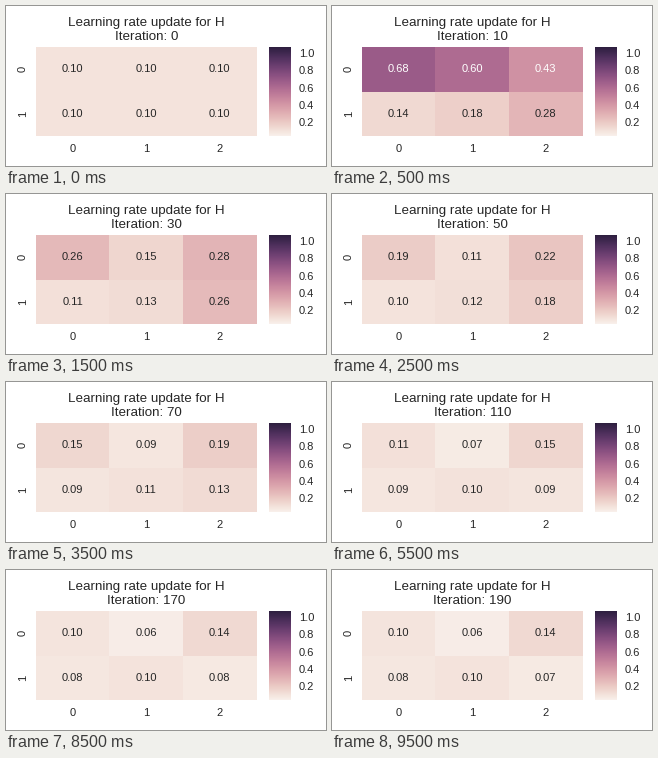
Animation of 320 by 160 pixels, one loop 10000 ms. Source, as a matplotlib script:

```python
import numpy as np
import matplotlib.pyplot as plt
from matplotlib.animation import FuncAnimation
from matplotlib.colors import ListedColormap, Normalize

W, H, DPI = 320, 160, 80
INK = "0.15"
STEP, FRAMES, INTERVAL = 10, 20, 500

plt.rcParams.update({
    "font.family": "Liberation Sans",
    "font.size": 10,
    "text.color": INK,
    "xtick.color": INK,
    "ytick.color": INK,
})

INITIAL = 0.1
PEAK_ITER, KNEE_ITER, DECAY = 10, 30, 36
PEAK = np.array([[0.68, 0.60, 0.43], [0.14, 0.18, 0.28]])
KNEE = np.array([[0.264, 0.155, 0.285], [0.114, 0.13, 0.26]])
LIMIT = np.array([[0.095, 0.059, 0.138], [0.084, 0.10, 0.072]])


def rates_at(iteration):
    """Jump to the peak, fall geometrically to the knee, then settle exponentially."""
    if iteration < PEAK_ITER:
        return np.full(PEAK.shape, INITIAL)
    if iteration < KNEE_ITER:
        progress = np.log(iteration / PEAK_ITER) / np.log(KNEE_ITER / PEAK_ITER)
        return PEAK * (KNEE / PEAK) ** progress
    return LIMIT + (KNEE - LIMIT) * np.exp((KNEE_ITER - iteration) / DECAY)


def cubehelix_map(start=0, rot=0.4, hue=0.8, light=0.95, dark=0.15):
    x = np.linspace(light, dark, 256)
    amp = hue * x * (1 - x) / 2
    phi = 2 * np.pi * (start / 3 + rot * x)
    weights = [(-0.14861, 1.78277), (-0.29227, -0.90649), (1.97294, 0)]
    rgb = [x + amp * (p * np.cos(phi) + q * np.sin(phi)) for p, q in weights]
    return ListedColormap(np.clip(np.transpose(rgb), 0, 1))


def text_color(rgb):
    rgb = np.asarray(rgb)
    linear = np.where(rgb <= 0.03928, rgb / 12.92, ((rgb + 0.055) / 1.055) ** 2.4)
    return INK if linear @ [0.2126, 0.7152, 0.0722] > 0.408 else "white"


def add_axes(left, top, right, bottom):
    return fig.add_axes([left / W, 1 - bottom / H, (right - left) / W, (bottom - top) / H])


fig = plt.figure(figsize=(W / DPI, H / DPI), dpi=DPI, facecolor="white")
ax = add_axes(29.9, 41, 250.55, 130)
cax = add_axes(263, 41, 285, 130)

cmap = cubehelix_map()
norm = Normalize(0.043, 1.068)

mesh = ax.pcolormesh(rates_at(0), cmap=cmap, norm=norm)
ax.invert_yaxis()
ax.set_xticks(np.arange(3) + 0.5, range(3))
ax.set_yticks(np.arange(2) + 0.5, range(2), rotation=90, va="center")
ax.tick_params(length=0, pad=7)
ax.spines[:].set_visible(False)
title = ax.set_title("", fontsize=12, pad=6, linespacing=1.3)
labels = [ax.text(col + 0.5, row + 0.5, "", ha="center", va="center")
          for row in range(2) for col in range(3)]

bar = fig.colorbar(mesh, cax=cax, ticks=np.arange(1, 6) / 5)
bar.outline.set_visible(False)
cax.tick_params(length=0, pad=7)


def update(frame):
    iteration = frame * STEP
    rates = rates_at(iteration)
    mesh.set_array(rates)
    title.set_text(f"Learning rate update for H\nIteration: {iteration}")
    for label, rate in zip(labels, rates.flat):
        label.set_text(f"{rate:.2f}")
        label.set_color(text_color(cmap(norm(rate))[:3]))
    return [mesh, title, *labels]


anim = FuncAnimation(fig, update, frames=FRAMES, init_func=lambda: update(0),
                     interval=INTERVAL, repeat=True, repeat_delay=0)
plt.show()
```
